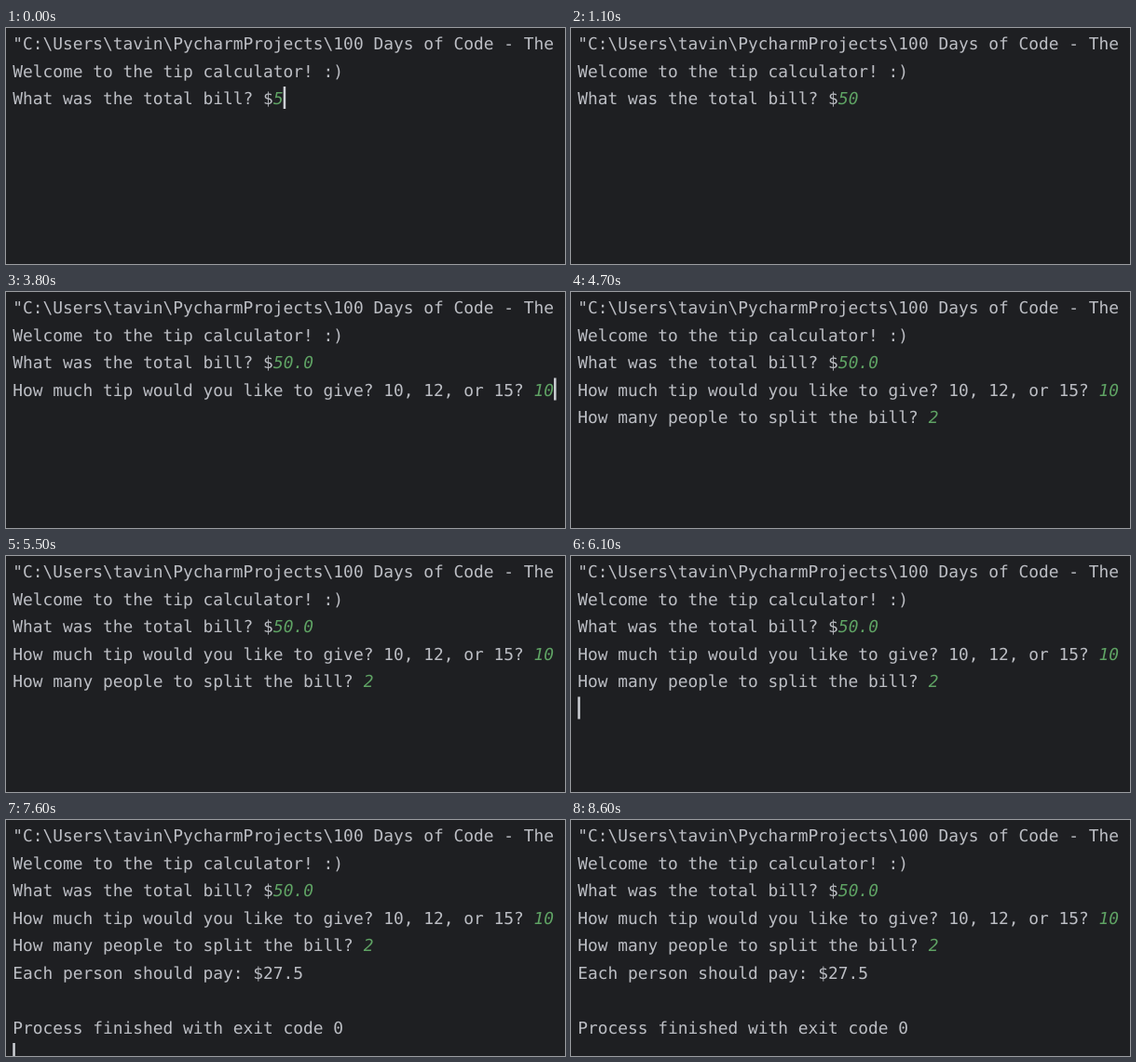
These frames come from a looping animation (600 by 254 pixels, 8.7 s). An HTML page with a canvas:

```html
<!DOCTYPE html>
<html lang="en">
<head>
<meta charset="utf-8">
<title>Tip calculator</title>
<style>
  html, body { margin: 0; height: 100%; overflow: hidden; background: #1e1f22; }
  canvas { display: block; }
</style>
</head>
<body>
<canvas width="600" height="254"></canvas>
<script>
const ctx = document.querySelector('canvas').getContext('2d');
const LOOP = 8700, BLINK = 475;
const LEFT = 7.3, CELL = 10.755, PITCH = 29.5, BASELINE = 23.1;
const FONT = `${CELL / 0.602}px "DejaVu Sans Mono", monospace`;
ctx.textRendering = 'geometricPrecision';

const session = [];
const print = (time, text) => session.push({ time, text });
const type = (time, keys, gap) =>
  [...keys].forEach((text, i) => session.push({ time: time + i * gap, text, typed: true }));
const ask = (time, question) => {
  print(time, '\n');
  print(time + 100, question);
};

print(0, '"C:\\Users\\tavin\\PycharmProjects\\100 Days of Code - The C\n');
print(0, 'Welcome to the tip calculator! :)\n');
print(0, 'What was the total bill? $');
type(0, '50', 500);
type(1400, '.0', 250);
ask(2300, 'How much tip would you like to give? 10, 12, or 15? ');
type(3400, '10', 200);
ask(4200, 'How many people to split the bill? ');
type(5300, '2');
print(6000, '\n');
print(6200, 'Each person should pay: $27.5\n\nProcess finished with exit code 0\n');

function draw(t) {
  ctx.fillStyle = '#1e1f22';
  ctx.fillRect(0, 0, 600, 254);

  let row = 0, col = 0, lastTime = 0;
  for (const { time, text, typed } of session) {
    if (t < time) break;
    lastTime = time;
    ctx.font = (typed ? 'italic ' : '') + FONT;
    ctx.fillStyle = typed ? '#5fa364' : '#bcbec4';
    text.split('\n').forEach((part, i) => {
      if (i) { row++; col = 0; }
      ctx.fillText(part, LEFT + col * CELL, BASELINE + row * PITCH);
      col += part.length;
    });
  }

  // The caret blinks, starting lit after each key or print
  if (Math.floor((t - lastTime) / BLINK) % 2 === 0) {
    ctx.fillStyle = '#ced0d6';
    ctx.fillRect(LEFT + col * CELL, 4 + row * PITCH, 2.5, 24);
  }
}

const start = performance.now();
function tick() {
  draw((performance.now() - start) % LOOP);
  requestAnimationFrame(tick);
}
tick();
</script>
</body>
</html>
```
